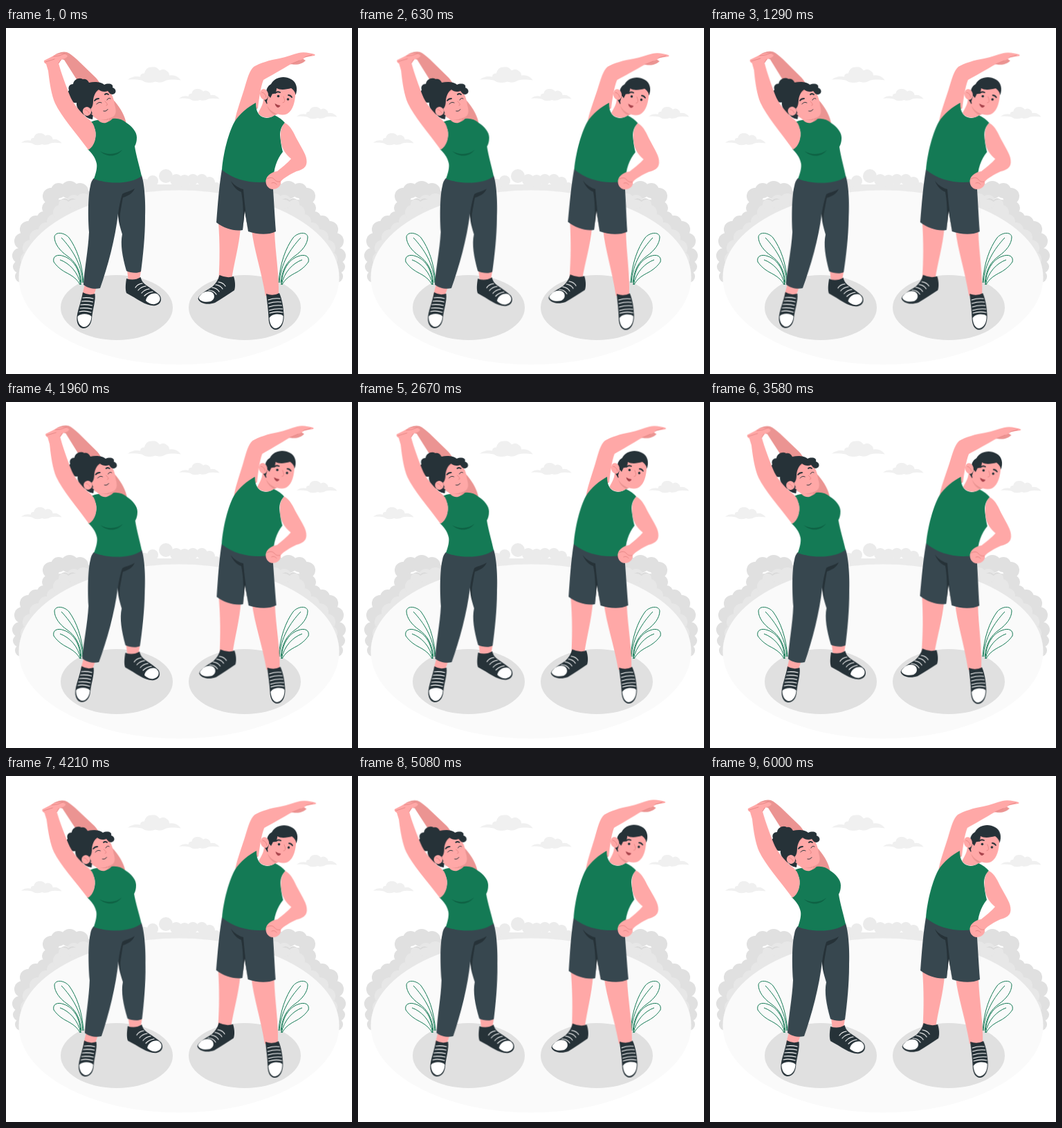
Recreate the animation shown at these times as an HTML page. Size 500 by 500 pixels, loop 6040 ms.

```html
<!DOCTYPE html>
<html lang="en">
<head>
<meta charset="utf-8">
<title>Side stretch</title>
<style>
  html, body { margin: 0; width: 100%; height: 100%; overflow: hidden; background: #fff; }
  svg { display: block; width: 100vw; height: 100vh; }
  .person { transform-box: view-box; }
  .skin { fill: #ffa8a7; }
  .shade { fill: #eb9492; }
  .top { fill: #147a55; }
  .fold { fill: #0e6244; }
  .cloth { fill: #37474f; }
  .dark { fill: #263238; }
  .toe { fill: #fff; }
  .line { fill: none; stroke: #263238; stroke-width: 1; stroke-linecap: round; }
  .brow { stroke-width: 1.9; }
  .crease { fill: none; stroke: #e58483; stroke-width: .9; stroke-linecap: round; }
  .lace { fill: none; stroke: #fff; stroke-width: 1.2; stroke-linecap: round; }
  .leaf { fill: none; stroke: #147a55; stroke-width: 1; }
</style>
</head>
<body>
<svg viewBox="0 0 500 500">
  <defs>
    <path id="cloud" fill="#f0f0f0" d="M0 18Q8 12 18 14Q18 9 24 9Q26 0 34 0Q42 -1 46 5Q52 1 57 6Q60 8 60 12Q70 10 77 19Q63 17 56 19Q48 24 40 21Q28 25 20 19Q10 17 0 18Z"/>
    <g id="bush">
      <g id="outer" fill="#e0e0e0"><path d="M20 366L18 310L45 285L62 250L120 243L125 270L60 340Z"/></g>
      <g id="inner" fill="#e7e7e7"><path d="M26 352L34 318L58 293L80 264L125 250L125 275L60 340Z"/></g>
      <path d="M80 248Q86 244 90 249Q95 244 101 248Q95 247 90 251Q86 247 80 248Z" fill="#dadada"/>
    </g>
    <g id="plant" class="leaf">
      <path d="M112 368C110 340 102 318 91 303C84 295 71 294 70 302C70 312 78 322 88 329C101 338 107 350 109 368"/>
      <path d="M80 303C95 319 109 340 111 368"/>
      <path d="M108 371C107 350 98 335 84 330C74 326 67 330 69 338C74 345 79 349 86 353C96 358 103 363 107 371"/>
      <path d="M78 335C92 340 104 353 108 371"/>
    </g>
  </defs>

  <use href="#cloud" x="176" y="56.5"/>
  <use href="#cloud" transform="translate(250 88) scale(.76)"/>
  <use href="#cloud" transform="translate(420 114) scale(.76)"/>
  <use href="#cloud" transform="translate(22 152) scale(.76)"/>

  <g id="hedge" fill="#ebebeb"><path d="M192 226H308V246H192Z"/></g>
  <use href="#bush"/>
  <use href="#bush" transform="matrix(-1 0 0 1 500 0)"/>

  <ellipse cx="250" cy="360.5" rx="231.5" ry="126" fill="#fafafa"/>
  <ellipse cx="160" cy="404" rx="81" ry="47" fill="#e0e0e0"/>
  <ellipse cx="345" cy="404" rx="81" ry="47" fill="#e0e0e0"/>
  <use href="#plant"/>
  <use href="#plant" transform="matrix(-1 0 0 1 506 0)"/>

  <g id="woman" class="person">
    <!-- raised far arm -->
    <path class="shade" d="M66 42C73 36 82 33 88 35C93 37 97 41 102 45L130 72C135 78 144 92 158 107C166 117 172 127 174 139L145 137L112 90L84 46Z"/>
    <!-- legs and shoes -->
    <path class="skin" d="M114 370L110 386Q119 391 127 386L131 374Z"/>
    <path class="skin" d="M175 350L177 366Q186 368 193 363L195 351Z"/>
    <path class="dark" d="M111 382Q119 387 128.500 384C130 394 125 407 124 420C123 429 118 434.500 111 434C105 433 101.500 426 102.500 417C104 406 109 394 111 382Z"/>
    <path class="toe" d="M103.500 417C107 412 120 412 123.500 417C123 426 118 432.500 112 432C107 431 103 425 103.500 417Z"/>
    <path class="lace" d="M111 390Q118 389 126 391M109.500 395Q117 394 125.500 396M108 400Q116 399 124.500 401M107 405Q115 404 124 406M106 410Q114 408 123 411"/>
    <path class="dark" d="M174 362Q185 366 194.500 360C196 366 199 369 203 372C210 377 217 381 222 386C226 392 224 399 216 401C204 403 191 392 174 383C172 377 173 369 174 362Z"/>
    <path class="toe" d="M202 394C203 386 213 381 219.500 385C225 390 223 397 215 399C210 400 205 397 202 394Z"/>
    <path class="lace" d="M187 375Q190 370 197 369M191 379Q195 374 202 373M196 383Q200 378 207 377M200 387Q205 382 212 381"/>
    <path class="cloth" d="M127 217C145 225 180 225 196 213C200 225 202 250 201 275C201 300 198 330 195 352C190 355 180 354 174 351C168 330 165 312 168 298C164 285 162 278 162 268C158 304 147 345 136 376C128 378 118 376 112 371C113 350 119 320 120 295C118 265 119 240 122 228Q123 221 127 217Z"/>
    <path class="dark" d="M186 232C180 236 172 237 168 240C165 250 163 259 162 270L168 298C165 284 164 275 165 268C167 256 168 250 169 245C176 243 183 239 186 232Z"/>
    <!-- torso -->
    <path class="top" d="M121 137Q127 133 134 133C140 138 149 137 154 131C162 130 168 132 174 137C182 142 189 150 189 158Q189 166 186 171C188 184 193 200 196 214C180 226 148 226 127 218C130 210 132 202 131 196C129 186 123 180 118 175C128 169 131 158 129 148Q127 141 121 137Z"/>
    <path class="fold" d="M136 178C145 187 160 187 168 176C160 183 146 184 136 178Z"/>
    <!-- head -->
    <path class="dark" d="M100 100L111 122Q115 131 125 132L128 112Z"/>
    <path class="skin" d="M123 124L133 133C139 140 150 138 149 130L147 116Z"/>
    <path class="shade" d="M132 130Q140 135 149 130Q148 134 144 133Q138 134 132 130Z"/>
    <path class="skin" d="M121 114C122 98 132 87 147 89C153 94 156 102 157 111C159 118 160 124 155 128C149 132 136 133 127 129Z"/>
    <path class="dark" d="M92 103C87 97 88 93 91 90C89 84 93 81 97 81C98 74 106 71 111 74Q117 73 120 79C128 77 138 78 142 82C148 79 156 81 154 86C160 88 160 95 154 96C150 96 149 93 147 91C143 93 137 92 134 89C129 92 127 98 126 104C126 110 125 115 122 117C115 113 111 118 113 126C106 122 101 114 102 108Q95 109 92 103Z"/>
    <ellipse class="skin" cx="117" cy="120.500" rx="6.200" ry="6.500" transform="rotate(-20 117 120.500)"/>
    <path class="crease" d="M114 118Q118 118 120 123M143 106Q149 111 145 112"/>
    <path class="line" d="M131 110Q134 106 138 108M146 104Q148 100 151 102"/>
    <path class="line brow" d="M128 105Q130 102 134 102M143 96Q145 94 148 96"/>
    <path class="line" stroke-width=".8" d="M141 120Q145 121 147 117.500"/>
    <!-- raised near arm -->
    <path class="skin" d="M55 47L69 40C75 37 84 36 89 40Q88 44 81 45L76 51C80 66 87 84 92 97C96 108 108 122 117 130Q127 136 129 148C131 158 128 171 119 176C100 150 80 128 71 109C66 98 63 80 61 62L58 52Q54 50 55 47Z"/>
    <path class="crease" d="M57 49L70 45M69 41L77 40L85 37M76 51L79 46"/>
  </g>

  <g id="man" class="person">
    <!-- legs and shoes -->
    <path class="skin" d="M307 281C309 310 309 335 307.500 361L326 364C329 341 337 315 339 288Z"/>
    <path class="skin" d="M355 291C358 320 369 350 375 387L394 387C395 355 389 325 388 293Z"/>
    <path class="dark" d="M308.500 357Q319 362 329 359C331 365 332 373 330 379C321 385 312 391 302 397C291 401 279 398 277.500 391C279 385 290 379 298 374Q306 367 308.500 357Z"/>
    <path class="toe" d="M278.500 390C281 383 292 377 299 383C303 388 300 393 296 395C288 397 280 395 278.500 390Z"/>
    <path class="lace" d="M307 367Q314 368 317 373M303 371Q310 372 313 377M298 375Q305 376 308 381M293 379Q300 379 304 385"/>
    <path class="dark" d="M376 384Q386 388 395 383C399 392 401 404 401.500 415C402 426 398 435.500 390 436C383 436 379.500 428 379.500 419C379 406 377 395 376 384Z"/>
    <path class="toe" d="M380.500 419C384 413 396 412 400.500 416C401 425 397 433 390 434C384 434 381 427 380.500 419Z"/>
    <path class="lace" d="M379 393Q387 390 396 391M379.500 398Q388 395 397.500 396M380 403Q389 400 398.500 401M380.500 408Q390 405 399.500 406M381 412Q390 409 400 411"/>
    <path class="cloth" d="M312 204C332 221 362 225 385 220C387 245 388 268 390 294C378 300 362 298 350 294L345 262L342 292C330 294 316 290 304 281C306 255 308 228 312 204Z"/>
    <path class="dark" d="M325 221C330 228 338 232 343 233C344 245 345 255 350 294L345 264L342 292C344 265 342 248 340 237C334 235 328 229 325 221Z"/>
    <!-- raised arm -->
    <path class="shade" d="M408 50C416 55 427 53 433 47L425 42Z"/>
    <path class="skin" d="M446 38C440 36 430 34 423 36C415 38 405 42 395 44C382 46 366 51 358 56C352 61 349 72 344 89C338 108 332 124 330 138L364 116C366 100 368 85 372 75C383 69 398 60 412 52L424 47Q430 45 433 42L446 40Q447 39 446 38Z"/>
    <path class="crease" d="M412 52L424 47M432 42L442 39"/>
    <!-- torso -->
    <path class="top" d="M361 108Q361 119 365 124C371 132 382 131 388 126Q397 130 403 137C398 142 396 148 396 155C397 164 398 172 400 179C391 190 387 203 386 221C362 226 332 222 312 205C314 180 322 150 330 136C337 124 350 114 361 108Z"/>
    <!-- head -->
    <path class="skin" d="M372 101C372 112 366 118 364.500 123C370 131 382 131 388 126L392 116Z"/>
    <path class="shade" d="M377 112Q383 122 393 124L389 126Q380 122 377 112Z"/>
    <path class="dark" d="M371 100L377 110L384 101L380 88Z"/>
    <path class="skin" d="M381 92C386 82 402 82 418 89C419 101 416 115 410 121C405 127 396 126 389 123C382 119 378 114 377 106Z"/>
    <path class="dark" d="M377 95C375 89 378 84 383 81C388 71 402 68 412 74C420 78 422 88 418.500 97C418 92 415 89 412 87C405 89 396 90 391 87C391 93 388 96 385 95L382 101Z"/>
    <ellipse class="skin" cx="373" cy="96" rx="6" ry="7.800" transform="rotate(-12 373 96)"/>
    <path class="crease" d="M370 93Q375 94 376 100M401 99Q405 108 400 108"/>
    <circle class="dark" cx="393.500" cy="98.500" r="1.800"/>
    <circle class="dark" cx="407.500" cy="103" r="1.800"/>
    <path class="line brow" d="M389 94Q392 91 396 93M408 97Q411 97 413 100"/>
    <path d="M388.500 109Q393 112 396.500 112Q395 116 391.500 114.500Q389 113 388.500 109Z" fill="#a7434b"/>
    <!-- arm on hip -->
    <path class="skin" d="M403 137C412 142 416 152 420 160C428 175 435 184 434.500 194C434 202 428 205 420 207C410 212 402 216 397 222C398 230 390 233 385 233C378 232 375 226 375.500 220C377 212 385 208 392 207C398 202 407 195 412 189C404 182 400 176 398 168C396 158 395 144 403 137Z"/>
    <path class="crease" d="M377 218Q384 214 388 219Q391 223 396 222M384 224Q388 222 391 226"/>
  </g>
</svg>
<script>
  const get = id => document.getElementById(id);

  // Each blob is [x, y, radius].
  function addBlobs(id, blobs) {
    for (const [cx, cy, r] of blobs) {
      const dot = document.createElementNS("http://www.w3.org/2000/svg", "circle");
      Object.entries({ cx, cy, r }).forEach(([k, v]) => dot.setAttribute(k, v));
      get(id).append(dot);
    }
  }

  addBlobs("outer", [[22, 359, 9], [19, 345, 9], [20, 329, 11], [24, 308, 12], [32, 291, 12],
    [43, 282, 11], [54, 274, 9], [62, 260, 10], [65, 243, 12], [76, 235, 11], [92, 234, 13],
    [107, 236, 12], [116, 245, 10]]);
  addBlobs("inner", [[29, 351, 9], [32, 334, 11], [36, 318, 12], [46, 303, 12], [58, 292, 11],
    [70, 280, 11], [80, 267, 12], [85, 255, 9], [98, 251, 10], [112, 250, 11]]);
  addBlobs("hedge", [[200, 226, 8], [212, 221, 8], [231, 214, 10], [246, 220, 9], [258, 221, 9],
    [270, 219, 8], [283, 219, 8], [294, 223, 8], [304, 229, 6]]);

  function sway(id, origin, duration) {
    const person = get(id);
    person.style.transformOrigin = origin;
    const steps = [[0, 0], [.25, 1], [.75, -1], [1, 0]];
    person.animate(
      steps.map(([offset, deg]) => ({ offset, transform: `rotate(${deg}deg)` })),
      { duration, iterations: Infinity }
    ).startTime = 0;
  }

  const LOOP = 6040;
  sway("woman", "139px 234px", LOOP);
  sway("man", "362px 236px", LOOP / 2);
</script>
</body>
</html>
```
